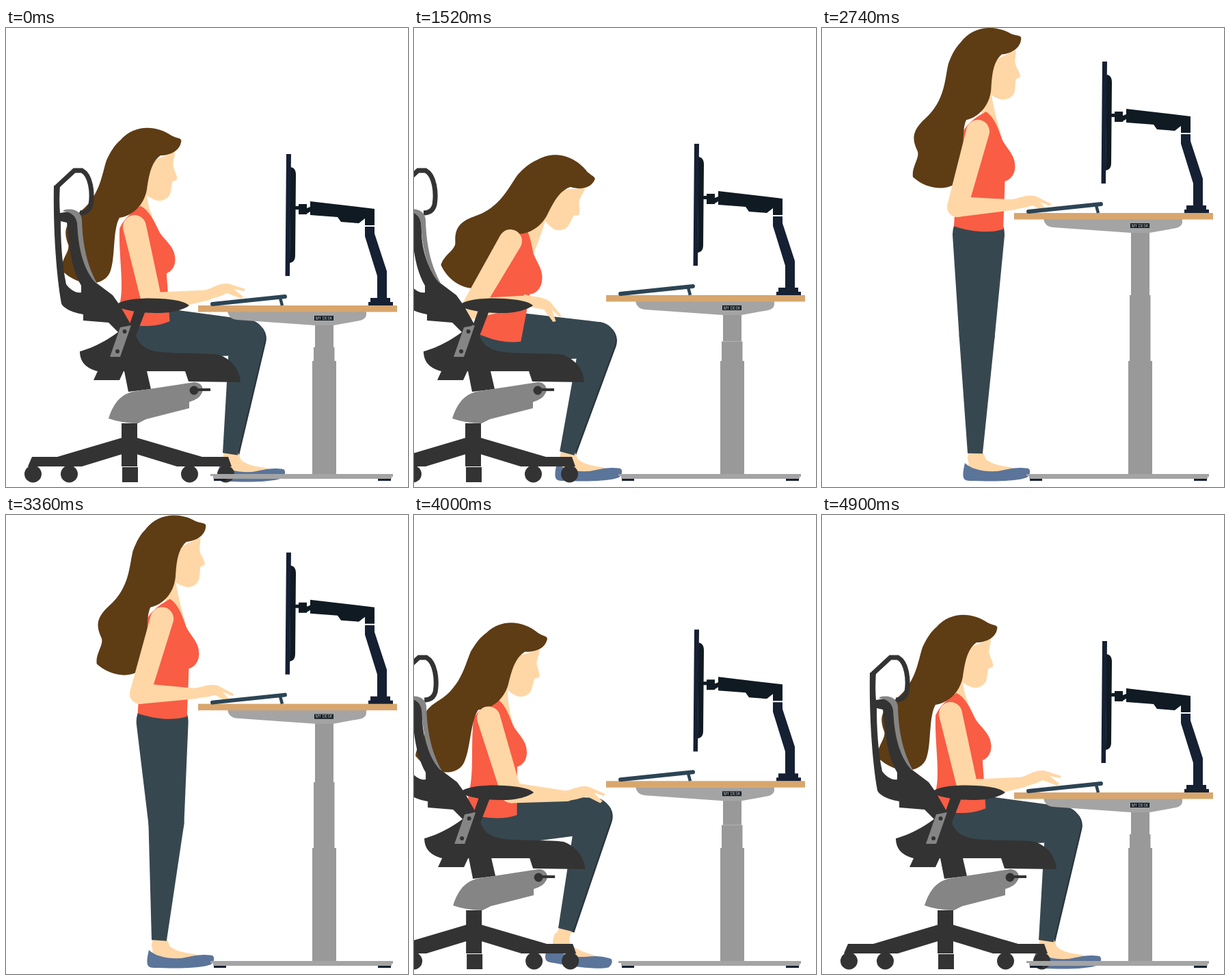
Recreate the animation shown at these times as an HTML page. Size 588x670 px, loop 4920 ms.

```html
<!DOCTYPE html>
<html lang="en">
<head>
<meta charset="utf-8">
<title>Sit and stand desk</title>
<style>
  html, body { margin: 0; width: 100%; height: 100%; overflow: hidden; background: #fff; }
  svg { display: block; width: 100%; height: 100%; }
  .skin { fill: #ffd7a6; } .red { fill: #f95d44; } .hair { fill: #5e3c14; }
  .pants { fill: #37474f; } .shade { fill: #2a353b; } .shoe { fill: #5b7499; }
  .dark { fill: #333; } .grey { fill: #858585; } .tube { fill: #999; }
  .frame { fill: #a4a4a4; } .wood { fill: #d8a66d; } .navy { fill: #162033; } .ink { fill: #101a22; }
</style>
</head>
<body>
<svg viewBox="0 0 588 670">
  <path id="shinShade" class="shade"/>
  <path id="ankle" class="skin"/>
  <g id="foot">
    <path class="skin" d="M-9,-2 L11,-2 L16,10 C30,20 45,19 55,22 L50,30 L-10,25Z"/>
    <path class="shoe" d="M-15,15 C-6,24 12,28 32,27 C50,24 58,20 78,23 C82,26 80,33 76,36 C60,42 30,42 -8,41 C-18,41 -20,36 -15,15Z"/>
  </g>
  <path id="shin" class="pants"/>
  <path id="thigh" class="pants"/>
  <path id="neck" class="skin"/>
  <path id="torso" class="red" d="M12,-29 C24,-21 29,-6 35,11 C41,25 55,34 54,53 C53,66 45,71 39,73 L38,100 L36,143 C16,149 -10,147 -36,138 L-34,110 C-24,85 -28,40 -22,0 C-12,-16 0,-22 12,-29Z"/>
  <g id="head">
    <path class="skin" d="M6,-49 L41,-63 C41,-54 37,-48 39,-40 C42,-32 45,-27 44,-23 C42,-20 37,-22 37,-18 L35,-6 C34,4 24,9 16,8 C8,6 2,2 -1,-1 L-11,-4 L-6,-34Z"/>
    <path class="hair" d="M50,-77 C48,-66 36,-58 20,-58 C6,-48 3,-28 0,-8 C-4,14 -20,30 -40,33 C-50,50 -46,90 -53,110 C-60,134 -100,136 -125,109 C-126,94 -112,82 -115,72 C-120,58 -124,44 -100,26 C-68,2 -66,-30 -59,-51 C-52,-66 -46,-74 -39,-80 C-18,-104 14,-102 36,-87 C46,-82 52,-84 50,-77Z"/>
  </g>
  <path id="forearm" class="skin"/>
  <path id="hand" class="skin" d="M-8,-6 C8,-10 14,-18 30,-17 L55,-9 L53,-6 L38,-9 L52,2 L49,5 L28,-3 C18,2 8,5 -6,8Z"/>
  <path id="arm" class="skin"/>

  <g id="chair">
    <path fill="none" stroke="#333" stroke-width="7" d="M74,232 L100,208 L111,208 C124,215 127,240 124,258 C122,266 117,270 108,270"/>
    <path class="dark" fill-rule="evenodd" d="M70,230 L79,230 C78,245 78,258 79,270 L92,268 Q104,272 105,290 C104,325 116,355 132,372 L156,390 L166,404 L182,432 L166,446 L150,430 L113,427 L113,418 C100,416 84,410 81,402 C72,350 69,280 70,230Z M80,282 L89,284 C93,320 95,350 110,376 L110,386 C102,388 92,380 88,374 C82,345 80,310 80,282Z"/>
    <path class="grey" d="M84,266 C96,262 110,266 111,280 C112,320 120,350 134,374 L130,371 C112,350 106,320 104,285 C102,272 92,268 84,268Z"/>
    <path class="dark" d="M108,472 C125,468 150,455 165,443 L189,442 C191,460 202,470 225,473 C260,476 290,474 312,477 C332,485 342,500 343,517 L267,516 L262,501 L172,501 L166,514 L128,514 L134,501 C118,497 108,488 108,472Z"/>
    <path class="dark" d="M173,501 L206,501 L212,527 L179,531Z"/>
    <path class="dark" d="M160,406 C165,396 200,393 225,395 C245,396 262,399 268,405 C262,410 245,416 225,416 C205,416 180,415 160,406Z"/>
    <path class="dark" d="M188,412 L204,413 L178,480 L164,480Z"/>
    <path class="grey" d="M167,437 L183,434 L167,480 L152,480Z"/>
    <circle class="dark" cx="173.500" cy="443" r="3"/><circle class="dark" cx="163" cy="472" r="3"/>
    <path class="grey" d="M150,570 C158,545 170,533 190,530 L275,517 C285,517 290,525 287,532 C283,540 277,543 268,546 L268,555 L205,571 L193,577 Q170,577 150,570Z"/>
    <circle class="dark" cx="275" cy="529" r="6.500"/><path class="dark" d="M279,526H299V530H279Z"/>
    <path class="dark" d="M169,577H192V640H169Z M170,641H193V663H170Z"/>
    <path class="dark" d="M170,598 L75,626 H38 L32,640 H111 L170,622 H191 L250,640 H330 L325,626 H287 L191,598Z"/>
    <g id="casters" class="dark"></g>
  </g>

  <rect id="tubeTop" class="tube" x="452" width="27"/>
  <rect id="tubeMid" class="tube" x="450" width="30.500"/>
  <rect class="tube" x="448" y="486" width="35" height="167"/>
  <path class="frame" d="M299,651H566V655H564V658H303V654H299Z"/>
  <path class="navy" d="M304,658H322V661H304Z M544,658H563V661H544Z"/>

  <g id="desk">
    <path class="frame" d="M324,414 H527 V419 Q526,425 518,427 L479,434 H452 L338,426 Q326,425 324,414Z"/>
    <rect class="ink" x="451" y="420" width="28" height="7"/>
    <text x="465" y="425.700" fill="#ccc" font-family="Inter, sans-serif" font-size="5.500" text-anchor="middle">MY DESK</text>
    <rect class="wood" x="281" y="405" width="291" height="9.500"/>
    <path fill="none" stroke="#2c4454" stroke-width="6" stroke-linecap="round" d="M302,403 L408,392"/>
    <path fill="none" stroke="#2c4454" stroke-width="4.500" d="M401,394 L404,405"/>
    <path class="ink" d="M416,203 C422,204 424,208 424,214 L423,332 C423,340 419,342 415,343Z"/>
    <path class="navy" d="M410,184H417L415,362H408.500Z"/>
    <path class="ink" d="M423,260H428V257H440V263L445,261V268L440,271V272H428V265H423Z"/>
    <path class="ink" d="M445,253 L539,264 V288 H525 V278 L516,285 L490,283 L485,276 L445,273Z"/>
    <path class="navy" d="M525,290 H539 V300 L557,355 V394 H562 V400 H566 V405 H530 V400 H533 V394 H543 V362 L525,304Z"/>
  </g>
</svg>

<script>
const LOOP = 4920;
const $ = id => document.getElementById(id);
const set = (id, attrs) => { for (const k in attrs) $(id).setAttribute(k, attrs[k]); };
const place = (id, [x, y, turn]) => set(id, { transform: `translate(${x} ${y}) rotate(${turn})` });

const sine = t => (1 - Math.cos(Math.PI * t)) / 2;
const easeIn = t => t * t, easeOut = t => t * (2 - t), linear = t => t;

// Blends numbers, arrays and objects.
function mix(a, b, t) {
  if (typeof a === 'number') return a + (b - a) * t;
  if (Array.isArray(a)) return a.map((v, i) => mix(v, b[i], t));
  return Object.fromEntries(Object.keys(a).map(k => [k, mix(a[k], b[k], t)]));
}

// A track is a list of [time, value, easing towards this key].
function sample(track, time) {
  const i = track.findIndex(key => key[0] > time);
  if (i < 0) return track[track.length - 1][1];
  const [t0, from] = track[i - 1], [t1, to, ease = sine] = track[i];
  return from === to ? from : mix(from, to, ease((time - t0) / (t1 - t0)));
}

// Joints as [x, y] or [x, y, turn]; a seated body moves along with the chair.
const typing = {
  seated: 1, shade: 3, head: [206, 244, 0], shoulder: [188, 290], wrist: [295, 390, 0],
  hip: [205, 444], foot: [328, 621, 0], ankle: [0, 0]
};
const rolling = { ...typing, wrist: [250, 416, -6], foot: [210, 611, 12], ankle: [11, -13] };
const leaning = {
  seated: 0, shade: 3, head: [192, 281, 18], shoulder: [141, 311], wrist: [165, 398, 33],
  hip: [121, 450], foot: [224, 620, 0], ankle: [0, 0]
};
const rising = {
  ...leaning, shade: 1, head: [266, 119, 8], shoulder: [233, 166], wrist: [210, 348, 90], hip: [217, 316]
};
const standing = {
  ...leaning, shade: 0, head: [248, 98, -5], shoulder: [228, 151], wrist: [280, 258, 8], hip: [229, 301]
};

const poseTrack = [
  [0, typing], [560, typing], [860, rolling], [1240, rolling], [1510, leaning], [1550, leaning],
  [1800, rising, easeIn], [2050, standing, easeOut], [3300, standing], [3660, rising, easeIn],
  [3800, leaning, linear], [4120, rolling], [4540, rolling], [4820, typing], [LOOP, typing]
];
const chairTrack = [
  [0, 0], [840, 0], [1400, -94], [1540, -94], [2060, -380], [3260, -380],
  [3710, -94], [3960, -94], [4540, 0], [LOOP, 0]
];
const deskTrack = [[0, 0], [1304, 0], [2304, -135], [3230, -135], [4230, 0], [LOOP, 0]];
const tubeTrack = [[0, 466], [1304, 466], [2304, 390], [3400, 390], [4230, 466], [LOOP, 466]];

// Outline around two circles; a flat end cuts the second one off.
function limb([x1, y1], r1, [x2, y2], r2, flat) {
  const angle = Math.atan2(y2 - y1, x2 - x1);
  const spread = Math.acos((r1 - r2) / Math.hypot(x2 - x1, y2 - y1));
  const at = (x, y, r, a) => `${x + r * Math.cos(a)},${y + r * Math.sin(a)}`;
  const lo = angle - spread, hi = angle + spread;
  const end = flat ? 'L' : `A${r2},${r2} 0 ${+(r2 > r1)} 1 `;
  return `M${at(x1, y1, r1, hi)} A${r1},${r1} 0 ${+(r1 > r2)} 1 ${at(x1, y1, r1, lo)}` +
    `L${at(x2, y2, r2, lo)} ${end}${at(x2, y2, r2, hi)}Z`;
}

// Middle joint of a two-bone chain, bent to the given side.
function joint([x1, y1], [x2, y2], len1, len2, side) {
  const d = Math.hypot(x2 - x1, y2 - y1), ux = (x2 - x1) / d, uy = (y2 - y1) / d;
  const along = (len1 * len1 - len2 * len2 + d * d) / (2 * d);
  const out = side * Math.sqrt(Math.max(0, len1 * len1 - along * along));
  return [x1 + ux * along - uy * out, y1 + uy * along + ux * out];
}

// Point given in a turned frame, in stage coordinates.
function fromFrame([ox, oy, turn], x, y) {
  const a = turn * Math.PI / 180, c = Math.cos(a), s = Math.sin(a);
  return [ox + x * c - y * s, oy + x * s + y * c];
}

function drawPerson(pose, chairX) {
  const moved = ([x, ...rest]) => [x + chairX * pose.seated, ...rest];
  const head = moved(pose.head), shoulder = moved(pose.shoulder), hip = moved(pose.hip);

  const spine = Math.atan2(hip[1] - shoulder[1], hip[0] - shoulder[0]);
  const torso = [...shoulder, spine * 180 / Math.PI - 90];
  place('torso', torso);
  place('head', head);
  const nape = fromFrame(head, -16, -8), jaw = fromFrame(head, 0, -2), throat = fromFrame(head, 1, 22);
  set('neck', { d: `M${nape} L${jaw} Q${throat} ${fromFrame(torso, 36, 13)} L${fromFrame(torso, 6, -20)}Z` });

  const elbow = joint(shoulder, pose.wrist, 114, 82, 1);
  set('arm', { d: limb(shoulder, 17, elbow, 15) });
  set('forearm', { d: limb(elbow, 15, pose.wrist, 7.5) });
  place('hand', pose.wrist);

  const foot = pose.foot;
  const ankle = [foot[0] + pose.ankle[0], foot[1] + pose.ankle[1]];
  const knee = joint(hip, ankle, 148, 171, -1);
  const behind = ([x, y]) => [x + pose.shade, y + pose.shade / 2];
  set('thigh', { d: limb(hip, 38, knee, 26) });
  set('shin', { d: limb(knee, 26, ankle, 11, true) });
  set('shinShade', { d: limb(behind(knee), 25, behind(ankle), 10, true) });
  set('ankle', { d: limb(ankle, 9, [foot[0], foot[1] + 8], 11) });
  place('foot', foot);
}

function draw(time) {
  const chairX = sample(chairTrack, time);
  const deskY = sample(deskTrack, time), tubeY = sample(tubeTrack, time);
  drawPerson(sample(poseTrack, time), chairX);
  set('chair', { transform: `translate(${chairX} 0)` });
  set('desk', { transform: `translate(0 ${deskY})` });
  set('tubeTop', { y: 430 + deskY, height: tubeY - 430 - deskY });
  set('tubeMid', { y: tubeY, height: 487 - tubeY });
}

// Two pairs of casters mirrored about the column.
$('casters').innerHTML = [-141, -88, 88, 141]
  .map(x => `<circle cx="${180.5 + x}" cy="651" r="12.500"/>`).join('');

const start = performance.now();
function tick() {
  draw((performance.now() - start) % LOOP);
  requestAnimationFrame(tick);
}
tick();
</script>
</body>
</html>
```
